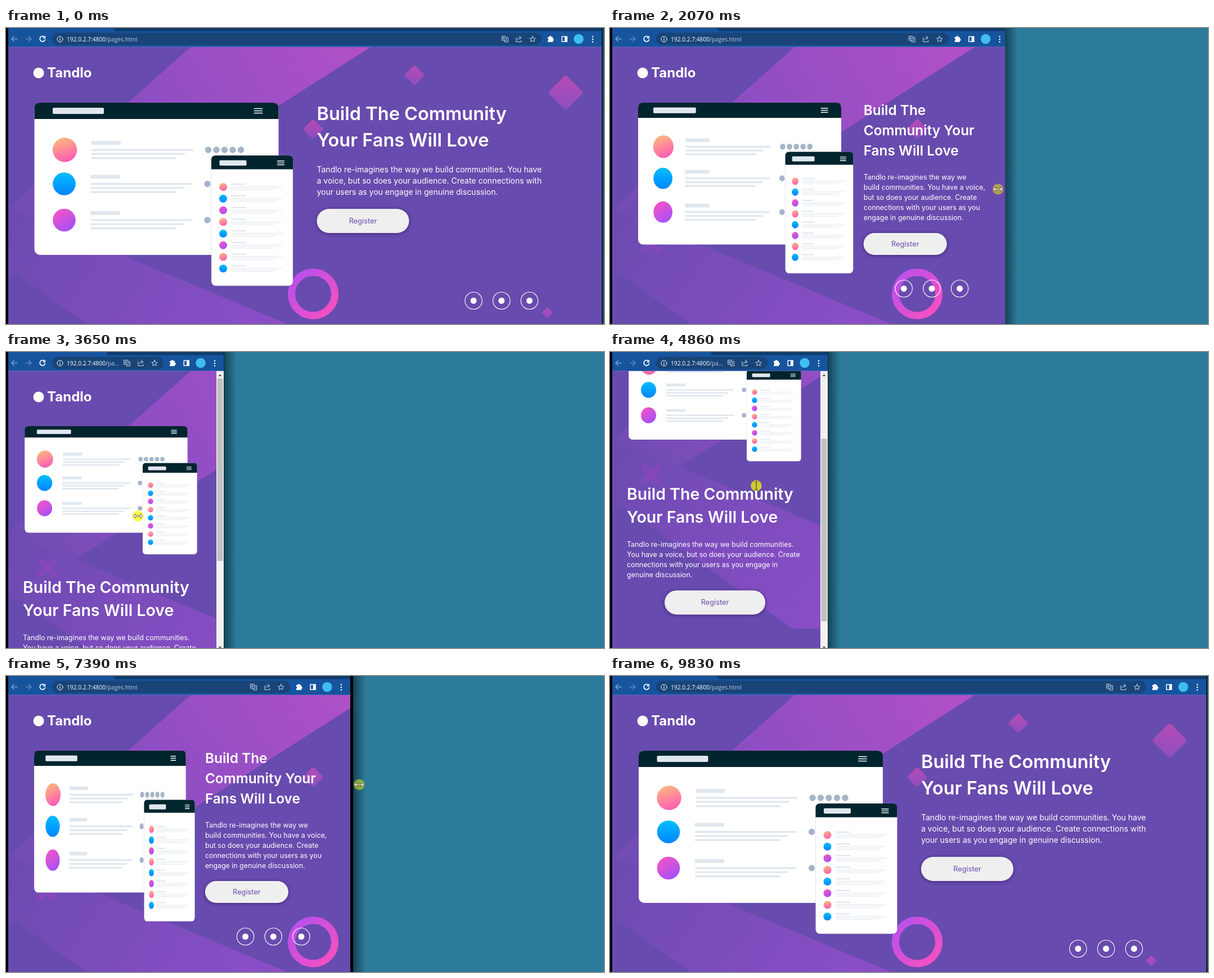
An HTML page that plays this animation: 1063 by 527 pixels, repeating every 9.96 s.

```html
<!DOCTYPE html>
<html lang="en">
<head>
<meta charset="utf-8">
<title>Responsive landing page</title>
<style>
  html, body { margin: 0; width: 100%; height: 100%; overflow: hidden; background: #2d7b9a; }
  #stage { display: block; width: 1063px; height: 527px; }
  text { font-family: Inter, "Open Sans", sans-serif; fill: #fff; white-space: pre; }
  .heading { font-weight: 600; }
  .brand { font-weight: 700; font-size: 24px; }
  .label { font-size: 12.8px; fill: #684bae; text-anchor: middle; }
  .url { font: 10.2px "Open Sans", "Noto Sans", sans-serif; }
  .bar { fill: #e0e7ee; }
  .dark { fill: #00252e; }
  .dot { fill: #a5b4c8; }
  .line { fill: none; stroke: #fff; stroke-linecap: round; stroke-linejoin: round; }
  #button rect { fill: #efefef; filter: drop-shadow(0 1px 3px rgba(20, 0, 60, .5)); }
</style>
</head>
<body>
<svg id="stage" viewBox="0 0 1063 527">
  <defs>
    <linearGradient id="bandTop" gradientUnits="userSpaceOnUse" x1="620" y1="34" x2="40" y2="400">
      <stop stop-color="#b050c6"/><stop offset=".5" stop-color="#904ec4"/><stop offset="1" stop-color="#6e4cb2"/>
    </linearGradient>
    <linearGradient id="bandLow" gradientUnits="userSpaceOnUse" x1="4" y1="370" x2="420" y2="660">
      <stop stop-color="#6e4bb2"/><stop offset="1" stop-color="#8c4ec8"/>
    </linearGradient>
    <linearGradient id="gem" x2="1" y2="1"><stop stop-color="#b64cb4"/><stop offset="1" stop-color="#8c4ec0"/></linearGradient>
    <linearGradient id="hoop" x2="1" y2="1"><stop stop-color="#b450ee"/><stop offset="1" stop-color="#fa50be"/></linearGradient>
    <linearGradient id="orange" x2=".35" y2="1"><stop stop-color="#ffc078"/><stop offset="1" stop-color="#ff62b0"/></linearGradient>
    <linearGradient id="blue" x2="0" y2="1"><stop stop-color="#00beff"/><stop offset="1" stop-color="#0084ff"/></linearGradient>
    <linearGradient id="pink" x2=".6" y2="1"><stop stop-color="#ff55be"/><stop offset="1" stop-color="#a850f6"/></linearGradient>
    <linearGradient id="shade"><stop stop-color="#001820" stop-opacity=".55"/><stop offset="1" stop-color="#001820" stop-opacity="0"/></linearGradient>
  </defs>

  <rect width="1063" height="527" fill="#2d7b9a"/>
  <rect id="shadow" width="22" height="527" fill="url(#shade)"/>
  <rect id="frame" height="527"/>

  <svg id="page" x="4" y="34" height="493">
    <rect width="1063" height="493" fill="#684bae"/>
    <g id="scroller">
      <path fill="url(#bandTop)" d="M328 34H648L4 446V322Z"/>
      <path fill="url(#bandLow)" d="M4 320L814 658H324L4 427Z"/>
      <g id="gems"></g>
      <circle cx="546" cy="473.5" r="38.5" fill="none" stroke="url(#hoop)" stroke-width="13"/>
      <path d="M61 371L85 395M85 371L61 395" stroke="#8547b9" stroke-width="9" stroke-linecap="round"/>
      <circle cx="58" cy="80" r="9.5" fill="#fff"/>
      <text class="brand" x="73" y="88">Tandlo</text>
      <g id="art"></g>
      <g id="copy"></g>
      <g id="button"><rect/><text class="label">Register</text></g>
      <g id="social"></g>
    </g>
    <g id="scrollbar">
      <rect width="13" height="493" fill="#f1f1f1"/>
      <path d="M3.500 9L6.500 5.500L9.500 9Z" fill="#555"/>
      <path d="M3.500 490.500L6.500 494L9.500 490.500Z" fill="#555"/>
      <rect id="thumb" x="1.500" width="10" height="325" fill="#c1c1c1"/>
    </g>
  </svg>

  <svg id="toolbar" x="4" height="34">
    <g transform="translate(-4)">
      <rect width="1067" height="34" fill="#17549e"/>
      <rect y="33" width="1067" height="1" fill="#4f68b4"/>
      <rect id="tabs" y="-6" width="1000" height="11.500" rx="5" fill="#0f3c6c"/>
      <rect id="address" x="82" y="8.500" height="22" rx="11" fill="#194478"/>
      <path class="line" stroke-width="1.500" style="stroke:#7ea0cc" d="M20 19.500H10M14.500 15L10 19.500L14.500 24"/>
      <path class="line" stroke-width="1.500" style="stroke:#6389bd" d="M35 19.500H45M40.500 15L45 19.500L40.500 24"/>
      <path class="line" stroke-width="1.700" d="M68.800 16.700A4.700 4.700 0 1 0 69.500 20.500"/>
      <path fill="#fff" d="M70 13.500V18.500H65Z"/>
      <circle cx="96" cy="20" r="5" class="line" stroke-width="1"/>
      <path class="line" stroke-width="1.200" d="M96 19.500V22.500M96 17.400V17.500"/>
      <text class="url" x="108" y="23.500">192.0.2.7:4800<tspan id="path" fill="#bccbe2"></tspan></text>
      <g id="tools">
        <g class="line" stroke-width="1" style="stroke:#cbd7e8">
          <path d="M-177 14.500H-171L-169 22H-177ZM-170 17H-166.500V25H-172.500L-173 22M-175 17H-173V19.500H-175Z"/>
          <path d="M-152 17V24.500H-143V22M-150 21Q-149 17 -144 17M-146.500 14.500L-143 17.500L-146.500 20"/>
          <path d="M-123 14.500L-121.500 18.200L-117.800 18.400L-120.700 20.800L-119.700 24.500L-123 22.400L-126.300 24.500L-125.300 20.800L-128.200 18.400L-124.500 18.200Z"/>
        </g>
        <path fill="#fff" d="M-96 16H-93.500A2 2 0 0 1 -89.500 16H-87V19A2 2 0 0 1 -87 23V25H-96V22.500A2 2 0 0 0 -96 18.700Z"/>
        <path fill="#fff" fill-rule="evenodd" d="M-71.500 14.500H-61V25H-71.500ZM-70 16V23.500H-66V16Z"/>
        <circle cx="-41" cy="19.500" r="8.700" fill="#3fbdf2"/>
        <g fill="#fff"><circle cx="-16" cy="15.500" r="1.300"/><circle cx="-16" cy="20" r="1.300"/><circle cx="-16" cy="24.500" r="1.300"/></g>
      </g>
    </g>
  </svg>

  <g id="cursor">
    <circle id="halo" r="9.700" fill="#ff0"/>
    <path id="resize" fill="#fff" stroke="#554a20" stroke-width=".8" d="M-8.500 0L-4.500 -3.800V-1H4.500V-3.800L8.500 0L4.500 3.800V1H-4.500V3.800Z"/>
    <path id="beam" fill="none" stroke="#333" d="M-2.500 -7H2.500M0 -7V7M-2.500 7H2.500"/>
  </g>
</svg>

<script>
const LOOP = 9960;
const $ = id => document.getElementById(id);
const set = (el, attrs) => Object.entries(attrs).forEach(([k, v]) => el.setAttribute(k, v));
const move = (el, x, y, extra = '') => el.setAttribute('transform', `translate(${x} ${y})${extra}`);
const show = (el, on) => { el.style.display = on ? '' : 'none'; };

const box = (x, y, w, h, r = 0, cls = 'bar') =>
  `<rect x="${x}" y="${y}" width="${w}" height="${h}" rx="${r}" class="${cls}"/>`;
const disc = (x, y, r, fill) => `<circle cx="${x}" cy="${y}" r="${r}" fill="url(#${fill})"/>`;
const repeat = (n, fn) => Array.from({ length: n }, (_, i) => fn(i)).join('');
const colors = ['orange', 'blue', 'pink'];

function listRow(i) {
  const y = [84, 144.5, 209][i], x = i ? 100 : 101.5;
  return disc(i ? 53 : 54, y, i ? 20.3 : 21.7, colors[i]) +
    box(x, y - 16, 52, 7, 1) +
    repeat(3, k => box(x, y - 1.8 + k * 7.3, 181 - k * 15, 3.6, 1.5)) +
    repeat(5, k => `<circle class="dot" cx="${(i ? 307.5 : 309) + k * 14.5}" cy="${y}" r="5.7"/>`);
}

function phoneRow(i) {
  const y = 150 + i * 20.75;
  return disc(335.5, y, 7, colors[i % 3]) + box(350, y - 6, 26, 2.2) +
    repeat(3, k => box(350, y - 1 + k * 2.8, 91 - k * 7.5, 1));
}

const header = (x, y, w, h, r) =>
  `<path class="dark" d="M${x} ${y + h}V${y + r}q0 ${-r} ${r} ${-r}h${w - 2 * r}q${r} 0 ${r} ${r}V${y + h}Z"/>`;
const menu = (x, y, w, gap, weight) =>
  `<path class="line" stroke-width="${weight}" d="${repeat(3, i => `M${x} ${y + i * gap}h${w}`)}"/>`;

$('art').innerHTML =
  '<rect width="434" height="271" rx="10" fill="#fff"/>' + header(0, 0, 434, 29, 10) +
  box(32.5, 9, 91, 11, 2) + menu(391, 10.5, 14, 4, 1.7) + repeat(3, listRow) +
  '<rect x="314.5" y="94" width="145" height="232" rx="8" fill="#fff" stroke="#8b90b8" stroke-opacity=".25"/>' +
  header(314.5, 94, 145, 24.5, 8) + box(329, 102.5, 48, 9.5, 2) +
  menu(432, 103.7, 12, 3.4, 1.4) + repeat(8, phoneRow);

$('gems').innerHTML = [[726, 84, 26], [546, 180, 26], [995, 115, 45], [962, 507, 14]].map(([x, y, s]) =>
  `<rect x="${-s / 2}" y="${-s / 2}" width="${s}" height="${s}" rx="${s / 9}" fill="url(#gem)" transform="translate(${x} ${y}) rotate(45)"/>`).join('');

$('social').innerHTML = repeat(3, i =>
  `<circle class="line" cx="${(i - 2) * 49.7}" r="15.2" stroke-width="1.1"/><circle cx="${(i - 2) * 49.7}" r="5.5" fill="#fff"/>`);

// Type blocks: [font size, first baseline, line step, lines]
const tallHead = ['Build The', 'Community Your', 'Fans Will Love'];
const wideHead = ['Build The Community', 'Your Fans Will Love'];
const layouts = [
  {
    head: [32.5, 163.5, 47, wideHead],
    body: [14, 256.5, 20.3, ['Tandlo re-imagines the way we build communities. You have',
      'a voice, but so does your audience. Create connections with', 'your users as you engage in genuine discussion.']],
    button: [322, 164, 43], socialY: 485.5,
  },
  {
    head: [32.5, 163.5, 47, tallHead],
    body: [14, 303.5, 20.25, ['Tandlo re-imagines the way we build', 'communities. You have a voice, but so',
      'does your audience. Create connections', 'with your users as you engage in', 'genuine discussion.']],
    button: [409, 164, 43], socialY: 485.5,
  },
  {
    head: [24.4, 154.5, 36, tallHead],
    body: [12.4, 269.5, 18, ['Tandlo re-imagines the way we', 'build communities. You have a voice,',
      'but so does your audience. Create', 'connections with your users as you', 'engage in genuine discussion.']],
    button: [365, 148, 39], socialY: 464,
  },
  {
    head: [28.5, 428.5, 41.5, wideHead],
    body: [12.4, 513, 18, ['Tandlo re-imagines the way we build communities.',
      'You have a voice, but so does your audience. Create', 'connections with your users as you engage in', 'genuine discussion.']],
    button: [590, 179, 43], socialY: 711,
  },
];

const typeset = ([size, y, step, lines], cls) => lines.map((line, i) =>
  `<text class="${cls}" font-size="${size}" y="${y + i * step}">${line}</text>`).join('');
$('copy').innerHTML = layouts.map(l => `<g>${typeset(l.head, 'heading')}${typeset(l.body, 'body')}</g>`).join('');
const copies = [...$('copy').children];

// Horizontal placement for a given window width
function place(w) {
  if (w > 975) {
    const x = 50.5 + (w - 1059) / 2;
    return { mode: 0, artX: x, textX: x + 502, socialX: w - 128.5 };
  }
  if (w > 800) {
    const x = 19.5 + (w - 817) * .5625;
    return { mode: 1, artX: x, textX: x + 502, socialX: w - 110 };
  }
  if (w > 600) return { mode: 2, artX: 50, sx: (w - 326) / 460, sy: .932, textX: w - 258, socialX: w - 87 };
  const mid = (w - 14) / 2;
  return { mode: 3, artX: mid - 153.3, artY: 132, sx: .667, sy: .7, textX: 30, buttonX: mid - 89.5, socialX: mid + 54.5 };
}

// Tracks: [time, value, ...]
const frameEdge = [[0, 1060], [1010, 1060], [1370, 943], [2070, 703], [3080, 387.5], [6800, 387.5], [7930, 827], [8600, 1046], [8740, 1061]];
const pageEdge = [[0, 1059], [1010, 1059], [1370, 945], [2070, 709], [3080, 387], [6800, 387], [7930, 817], [8600, 1040], [8740, 1060]];
const scrollTrack = [[4180, 0], [5130, 231]];
const cursorTrack = [[70, 1030, 503], [680, 1060, 285], [1010, 1060, 285], [1370, 927.5, 285], [2070, 690, 287], [3080, 387, 290],
  [3180, 387, 290], [3650, 234.5, 292], [4180, 234.5, 292], [4400, 260, 238], [5260, 260, 238], [5550, 409, 213],
  [5750, 409, 208], [6500, 389, 202], [6800, 389, 202], [7930, 845.5, 185.5], [8740, 1061, 180], [8810, 1061, 180], [9230, 1030, 509]];

function sample(track, t) {
  const next = track.findIndex(k => k[0] > t);
  if (next < 0) return track[track.length - 1].slice(1);
  if (next === 0) return track[0].slice(1);
  const a = track[next - 1], b = track[next], p = (t - a[0]) / (b[0] - a[0]);
  return a.slice(1).map((v, i) => v + (b[i + 1] - v) * p);
}

function drawPage(w, scroll) {
  const { mode, artX, artY = 133, sx = 1, sy = 1, textX, buttonX = textX, socialX } = place(w);
  const { button: [by, bw, bh], socialY } = layouts[mode];
  const narrow = mode === 3;
  move($('scroller'), -4, -34 - (narrow ? scroll : 0));
  move($('art'), artX, artY, ` scale(${sx} ${sy})`);
  copies.forEach((el, i) => show(el, i === mode));
  move($('copy'), textX, 0);
  move($('button'), buttonX, by);
  set($('button').firstChild, { width: bw, height: bh, rx: bh / 2 });
  set($('button').lastChild, { x: bw / 2, y: bh / 2 + 4.5 });
  move($('social'), socialX, socialY);
  show($('scrollbar'), narrow);
  move($('scrollbar'), w - 17, 0);
  set($('thumb'), { y: 13 + scroll * 150 / 231 });
}

function drawCursor(t) {
  show($('cursor'), t >= 70 && t < 9230);
  move($('cursor'), ...sample(cursorTrack, t));
  const dragging = (t > 1010 && t < 3100) || (t > 6800 && t < 8740);
  const overText = t >= 4180 && t < 5400;
  set($('halo'), { opacity: dragging ? .47 : .7 });
  show($('resize'), !overText);
  show($('beam'), overText);
}

function draw(t) {
  const [edge] = sample(frameEdge, t), [w] = sample(pageEdge, t);
  const visible = Math.min(edge, w) - 4;
  const compact = w < 420;
  set($('frame'), { width: edge });
  set($('shadow'), { x: edge });
  set($('page'), { width: visible });
  set($('toolbar'), { width: visible });
  set($('tabs'), { x: compact ? 179 : 191 });
  set($('address'), { width: w - 189 });
  $('path').textContent = compact ? '/pa...' : '/pages.html';
  move($('tools'), w, 0);
  drawPage(w, sample(scrollTrack, t)[0]);
  drawCursor(t);
}

const start = performance.now();
function tick() {
  draw((performance.now() - start) % LOOP);
  requestAnimationFrame(tick);
}
tick();
</script>
</body>
</html>
```
